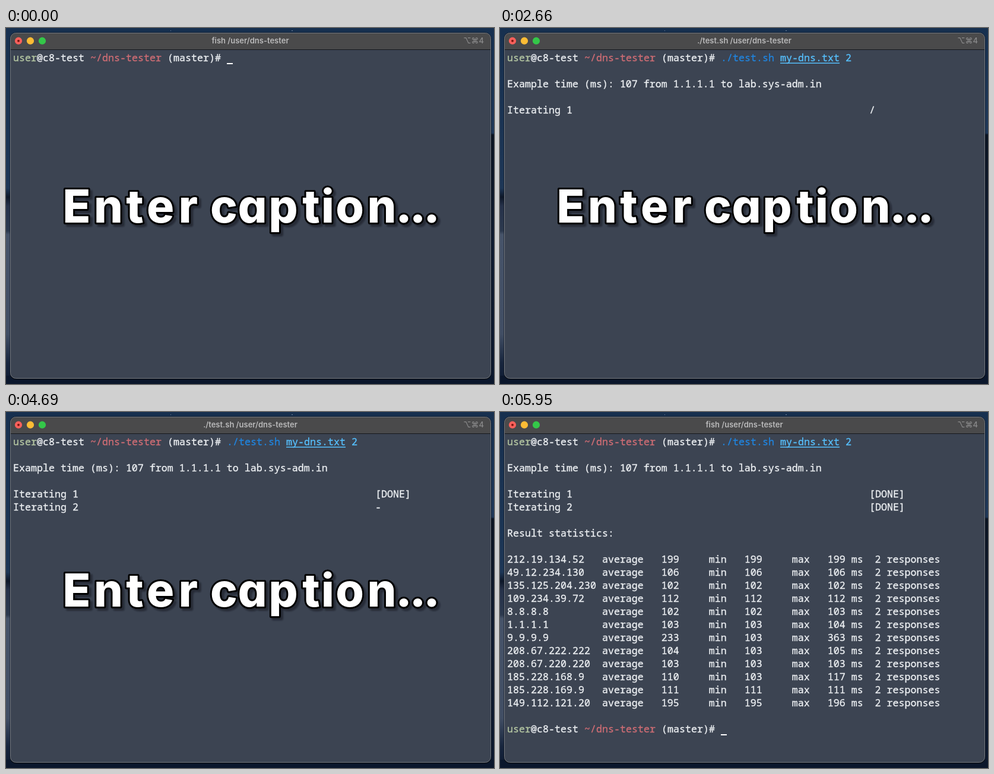
Write an HTML page that moves like this. It is 822 px wide and 600 px high and loops after 6.02 s.

```html
<!DOCTYPE html>
<html lang="en">
<head>
<meta charset="utf-8">
<title>Terminal</title>
<style>
html, body { margin: 0; width: 100%; height: 100%; overflow: hidden; background: #12233d; }
svg { display: block; width: 822px; height: 600px; }
text { white-space: pre; }
#term { font: 500 16.667px "Noto Sans Mono", monospace; stroke-width: .35; }
.bar { font: 600 13px Inter, "DejaVu Sans", sans-serif; fill: #bababb; }
.word { font: 800 77px Inter, sans-serif; font-feature-settings: "cv11"; text-anchor: middle; }
.dots { font: 900 84px Lato, sans-serif; }
#words { stroke-width: 6; stroke-linejoin: round; paint-order: stroke; }
</style>
</head>
<body>
<svg viewBox="0 0 822 600">
  <defs>
    <linearGradient id="left" x2="0" y2="1">
      <stop offset="0" stop-color="#17304f"/>
      <stop offset=".45" stop-color="#1d3656"/>
      <stop offset=".475" stop-color="#0d1728"/>
      <stop offset=".5" stop-color="#26324a"/>
      <stop offset=".57" stop-color="#2c394e"/>
      <stop offset=".58" stop-color="#47546a"/>
      <stop offset=".86" stop-color="#414e64"/>
      <stop offset=".94" stop-color="#17253d"/>
      <stop offset="1" stop-color="#0d1a31"/>
    </linearGradient>
    <linearGradient id="right" x2="0" y2="1">
      <stop offset="0" stop-color="#17304f"/>
      <stop offset=".295" stop-color="#1f3859"/>
      <stop offset=".3" stop-color="#0b1422"/>
      <stop offset=".6" stop-color="#101c31"/>
      <stop offset="1" stop-color="#0c182d"/>
    </linearGradient>
    <filter id="soft"><feGaussianBlur stdDeviation="1"/></filter>
  </defs>

  <rect width="822" height="600" fill="#17304f"/>
  <rect width="12" height="600" fill="url(#left)"/>
  <rect x="810" width="12" height="600" fill="url(#right)"/>
  <rect y="586" width="822" height="14" fill="#0b172c"/>
  <g fill="#7386a0"><rect x="277" y="4" width="1" height="1"/><rect x="481" y="4" width="2" height="1"/></g>

  <rect x="6.5" y="7.5" width="811" height="585" rx="10" fill="#080d15"/>
  <rect x="7.5" y="8.5" width="809" height="582" rx="9" fill="#3c4452"/>
  <path d="M7.5 36V17.5a9 9 0 0 1 9-9h791a9 9 0 0 1 9 9V36z" fill="#4a4a4b"/>
  <rect x="8" y="36" width="808" height="1" fill="#15181d"/>
  <rect x="7.5" y="8.5" width="809" height="582" rx="9" fill="none" stroke="#747981"/>
  <circle cx="21" cy="21.7" r="6.1" fill="#fc605b"/>
  <circle cx="21" cy="21.7" r="2" fill="#7d1712"/>
  <circle cx="41" cy="21.7" r="6.1" fill="#fdbc35"/>
  <circle cx="61" cy="21.7" r="6.1" fill="#34c749"/>
  <text id="title" class="bar" x="411.5" y="26" text-anchor="middle"></text>
  <text class="bar" x="805" y="25.5" text-anchor="end" style="font-weight:500;fill:#8b8b8c">⌥⌘4</text>

  <g id="term"></g>
  <rect id="cursor" width="10" height="2" fill="#fff"/>

  <g id="caption">
    <g opacity=".45" filter="url(#soft)"><use href="#words" x="4" y="4" fill="#0c1018" stroke="#0c1018"/></g>
    <use href="#words" fill="#fff" stroke="#000"/>
  </g>
  <defs>
    <g id="words">
      <text class="word" x="119 172.5 217 260 307" y="328">Enter</text>
      <text class="word" x="367 415 467 514 542 579 633" y="328">caption</text>
      <text class="dots" x="660 683.5 707" y="328">...</text>
    </g>
  </defs>
</svg>
<script>
const LOOP = 6020, STEP = 70;
const ENTER = 1470, EXAMPLE = 1610, ITER1 = 1750, DONE1 = 3640, RESULT = 5250, CLEAR = 5950;
const WHITE = '#eceff2', GREEN = '#b4c6a2', RED = '#cf6d74', BLUE = '#2085df', SKY = '#56bffc';
const COMMAND = './test.sh my-dns.txt 2';
const USER = 'user';
const SPIN = '\\|/-';
const el = id => document.getElementById(id);

// address, average, min, max
const stats = `212.19.134.52 199 199 199
49.12.234.130 106 106 106
135.125.204.230 102 102 102
109.234.39.72 112 112 112
8.8.8.8 102 102 103
1.1.1.1 103 103 104
9.9.9.9 233 103 363
208.67.222.222 104 103 105
208.67.220.220 103 103 103
185.228.168.9 110 103 117
185.228.169.9 111 111 111
149.112.121.20 195 195 196`.split('\n').map(line => {
  const [ip, avg, min, max] = line.split(' ');
  return ip.padEnd(16) + 'average   ' + avg.padEnd(8) + 'min   ' + min.padEnd(8) +
    'max   ' + max + ' ms  2 responses';
});

const put = (row, col, text, color = WHITE) =>
  `<text x="${12 + col * 10}" y="${56 + row * 22}" fill="${color}" stroke="${color}">${text}</text>`;

const prompt = row =>
  put(row, 0, USER, GREEN) + put(row, 4, '@c8-test') +
  put(row, 13, '~/dns-tester', RED) + put(row, 26, '(master)#');

function typed(t) {
  if (t < 350) return Math.min(3, Math.floor(t / STEP));
  const k = Math.floor((t - 350) / STEP) + 1;
  return Math.min(COMMAND.length, 3 + Math.round(k * 19 / 13));
}

function command(n) {
  const text = COMMAND.slice(0, n);
  const file = Math.max(0, Math.min(n, 20) - 10);
  return put(0, 36, text.slice(0, 9), BLUE) + put(0, 46, text.slice(10), SKY) +
    `<rect x="472" y="58.5" width="${file * 10}" height="1.5" fill="${SKY}"/>`;
}

function iteration(row, num, done, spin) {
  return put(row, 0, 'Iterating ' + num) + put(row, 61, done ? '[DONE]' : spin);
}

function draw(t) {
  const n = typed(t);
  const spin = SPIN[Math.floor(t / STEP) % 4];
  let out = prompt(0) + command(n);
  let cursor = [0, 36 + n];
  if (t >= ENTER) cursor = t < EXAMPLE ? [1, 0] : null;
  if (t >= EXAMPLE) out += put(2, 0, 'Example time (ms): 107 from 1.1.1.1 to lab.sys-adm.in');
  if (t >= ITER1) out += iteration(4, 1, t >= DONE1, spin);
  if (t >= DONE1) out += iteration(5, 2, t >= RESULT, spin);
  if (t >= RESULT) {
    out += put(7, 0, 'Result statistics:');
    stats.forEach((line, i) => out += put(9 + i, 0, line));
    out += prompt(22);
    cursor = [22, 36];
  }
  el('term').innerHTML = out;

  const running = t >= ENTER && t < RESULT;
  el('title').textContent = (running ? './test.sh' : 'fish') + ` /${USER}/dns-tester`;
  el('cursor').style.display = cursor ? '' : 'none';
  if (cursor) {
    el('cursor').setAttribute('x', 12 + cursor[1] * 10);
    el('cursor').setAttribute('y', 59 + cursor[0] * 22);
  }
  el('caption').style.display = t < CLEAR ? '' : 'none';
}

const start = performance.now();
let last = -1;
function tick() {
  const step = Math.floor((performance.now() - start) % LOOP / STEP);
  if (step !== last) draw((last = step) * STEP);
  requestAnimationFrame(tick);
}
tick();
</script>
</body>
</html>
```
